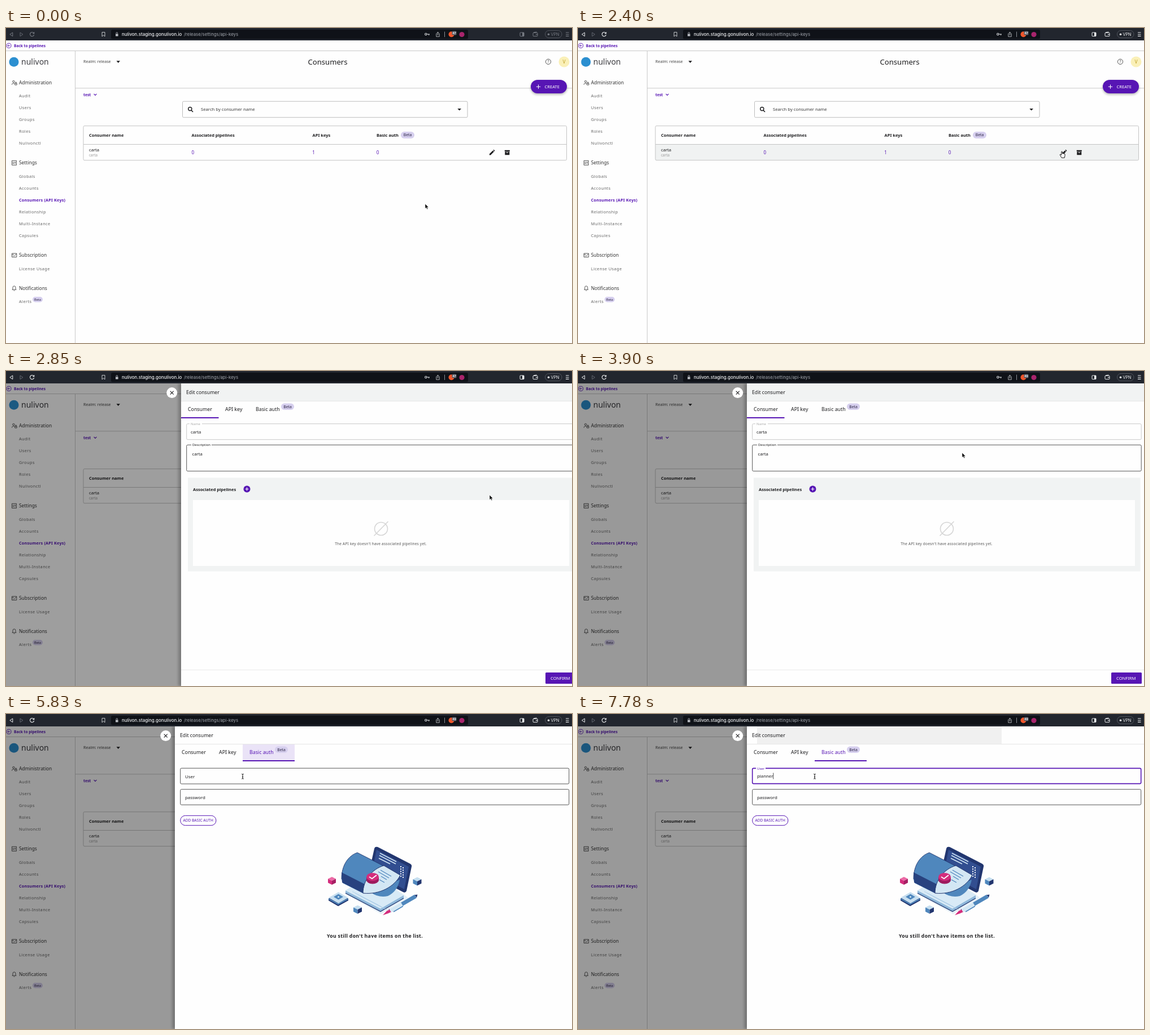
An HTML page for the animation above (8000 ms loop, 1002 by 559 pixels).

```html
<!DOCTYPE html>
<html lang="en">
<head>
<meta charset="utf-8">
<title>Edit consumer</title>
<style>
html, body { margin: 0; width: 100%; height: 100%; overflow: hidden; background: #fefefe; }
svg { display: block; width: 1002px; height: 559px; font-family: "Noto Sans", "Open Sans", sans-serif; }
text { white-space: pre; }
.ui { font-family: Inter, Roboto, sans-serif; }
</style>
</head>
<body>
<svg id="stage" viewBox="0 0 1002 559" xmlns="http://www.w3.org/2000/svg"></svg>
<script>
const PURPLE = '#5715b4', INK = '#1d1d1f', GREY = '#666', LINE = '#c9c9c9';
const NAVY = '#22366f', BLUE = '#4f87bd', PALE = '#d3e7f4', PINK = '#d42d7d';

// Drawing helpers, each returning SVG markup
const text = (x, y, s, size, fill = INK, extra = '') =>
  `<text x="${x}" y="${y}" font-size="${size}" fill="${fill}" ${extra}>${s}</text>`;
const rect = (x, y, w, h, fill, extra = '') =>
  `<rect x="${x}" y="${y}" width="${w}" height="${h}" fill="${fill}" ${extra}/>`;
const circle = (x, y, r, fill, extra = '') =>
  `<circle cx="${x}" cy="${y}" r="${r}" fill="${fill}" ${extra}/>`;
const fillPath = (d, fill, extra = '') => `<path d="${d}" fill="${fill}" ${extra}/>`;
const stroke = (d, color, width = 1, extra = '') =>
  `<path d="${d}" fill="none" stroke="${color}" stroke-width="${width}" ${extra}/>`;
const group = (id, body, extra = '') => `<g id="${id}" ${extra}>${body}</g>`;
const box = (x, y, w, h, color, width = 1) =>
  rect(x, y, w, h, 'none', `rx="2" stroke="${color}" stroke-width="${width}"`);
const medium = 'font-weight="500"', semi = 'font-weight="600"', bold = 'font-weight="700"';
const middle = 'text-anchor="middle"';

function badge(x, y, w, h, size) {
  return rect(x, y, w, h, '#d6cfee', `rx="${h / 2}"`) +
    text(x + w / 2, y + h / 2 + size * .36, 'Beta', size, '#2c2546', middle);
}

function browserBar() {
  const reload = 'M49.3 9.4A3.6 3.6 0 1 0 49.6 12M49.8 7.2V9.8H47.2';
  return rect(0, 0, 1002, 22, '#22262e') +
    rect(186, 3, 632, 16.5, '#0f1218', 'rx="2.5"') +
    stroke('M25 8L30 11.3 25 14.6z', '#6a6e76', .9) +
    stroke('M170 7.5H175V15L172.5 12.8 170 15z', '#d5d7da', .9) +
    rect(194, 10.5, 4.6, 4, '#b9bcc2', 'rx=".6"') + stroke('M195 10.5V9a1.3 1.3 0 0 1 2.6 0V10.5', '#b9bcc2', .8) +
    text(205, 14, 'nulivon.staging.gonulivon.io', 7.9, '#f2f3f5', 'class="ui" font-weight="500"') +
    text(315, 14, '/release/settings/api-keys', 7.8, '#a3a7ae', 'class="ui"') +
    group('key', circle(743.3, 11, 1.7, 'none', 'stroke="#d5d7da" stroke-width="1.1"') +
      stroke('M745 11H750M748.6 11V13', '#d5d7da', 1.1)) +
    stroke('M763 10H761.8V15.3H767.2V10H766M764.5 13V7.2M762.8 8.8L764.5 7.1 766.2 8.8', '#d5d7da', .8) +
    stroke('M776.5 6.5V16', '#8b8f96', 1) +
    circle(788.5, 11.3, 5, '#f0562b') + rect(789.5, 5.5, 8, 7, '#5b5f69', 'rx="1.5"') +
    `<text id="count" x="793.5" y="10.8" font-size="5" fill="#fff" class="ui" ${semi} ${middle}>47</text>` +
    circle(807, 11.5, 4.6, '#a8246c') +
    group('controls',
      stroke('M11.8 8L6.8 11.3 11.8 14.6z', 'currentColor', 1) + stroke(reload, 'currentColor', 1.1) +
      rect(910, 8, 7, 6.6, 'none', 'stroke="currentColor" rx=".8"') + rect(914, 8, 3, 6.6, 'currentColor') +
      rect(933, 8.4, 8, 6.2, 'none', 'stroke="currentColor" rx="1"') +
      stroke('M934 8L939.5 6.8M937.8 11.5H941', 'currentColor', 1) +
      rect(954.5, 4.5, 29.5, 13, 'none', 'rx="6.5" stroke="#5b5f68" stroke-width=".8"') +
      circle(960.5, 11.3, 1.8, 'currentColor') + text(964.5, 13.8, 'VPN', 7.2, 'currentColor', 'class="ui"') +
      stroke('M991 8H996.5M991 11.2H996.5M991 14.4H996.5', 'currentColor', 1.1));
}

function sidebar() {
  const heading = (y, s) => text(23, y + 3, s, 8.4, '#333');
  const item = (y, s) => text(23, y + 2.8, s, 7.3, GREY, 'letter-spacing=".46"');
  const icon = d => stroke(d, '#444', .9);
  const items = [[120, 'Audit'], [141, 'Users'], [162, 'Groups'], [183, 'Roles'], [204, 'Nulivonctl'],
    [263, 'Globals'], [284, 'Accounts'], [326, 'Relationship'], [347, 'Multi-Instance'],
    [368, 'Capsules'], [427, 'License Usage'], [485, 'Alerts']];
  const headings = [[97, 'Administration'], [239, 'Settings'], [403, 'Subscription'], [461.5, 'Notifications']];
  return circle(5, 31.3, 4.1, 'none', `stroke="${PURPLE}" stroke-width=".9"`) +
    stroke('M7.2 31.3H3M4.8 29.4L2.9 31.3 4.8 33.2', PURPLE, .9) +
    text(14, 33.8, 'Back to pipelines', 6.6, PURPLE, semi) +
    stroke('M0 40.5H1002M122.5 41V559M123 106.8H1002', LINE) +
    circle(14, 60.3, 8.5, '#2b8fd0') + text(27, 64.8, 'nulivon', 14, '#3c3c40') +
    headings.map(h => heading(...h)).join('') + items.map(i => item(...i)).join('') +
    text(23, 307.8, 'Consumers (API Keys)', 7.3, PURPLE, bold + ' letter-spacing=".17"') +
    badge(47, 477, 18, 9.5, 5.6) +
    icon('M10.5 100.5V99.3Q13 97 15 98.3M11.7 95a1.7 1.7 0 1 0 3.4 0a1.7 1.7 0 1 0-3.4 0M15.7 98.3H19.2V101H15.7zM16.5 98.2V97a1 1 0 0 1 2 0V98.2') +
    icon('M10.5 235.3H18.5V243.3H10.5zM12.8 237V241.6M16 237V241.6M11.9 240H13.7M15.1 238.4H16.9') +
    icon('M10.5 400H18.8V406.6H10.5zM10.5 402H14M12.3 404.7H13.6M14.5 405L18.8 400.2') +
    icon('M11 464.3L12 463V460.6a2.5 2.7 0 0 1 5 0V463L18 464.3zM13.6 466H15.4');
}

function listPage() {
  const head = (x, s) => text(x, 193, s, 7.5, INK, semi);
  const num = (x, s) => text(x, 223.8, s, 8, PURPLE);
  return text(137, 62.3, 'Realm: release', 7.1, '#444') + fillPath('M195.5 58.3H202L198.7 62z', INK) +
    text(569.5, 64.7, 'Consumers', 13.1, INK, medium + ' ' + middle) +
    circle(960, 59.8, 4.6, 'none', 'stroke="#444" stroke-width=".9"') +
    text(960, 62.4, '?', 7, '#444', middle) +
    circle(988, 60, 9.5, '#faf0b8') + text(988, 63, 'V', 8.4, '#bf9f26', middle) +
    rect(929, 94, 64, 24, '#000', 'rx="12" opacity=".3" filter="url(#blur)"') +
    rect(929, 92, 64, 24, PURPLE, 'rx="12"') +
    stroke('M938.8 104.2H946.2M942.5 100.5V107.9', '#fff', 1) +
    text(953.5, 106.9, 'CREATE', 7.6, '#fff', medium) +
    text(137, 120.5, 'test', 6.8, PURPLE, bold) + stroke('M155.6 116.8L158 119.3 160.4 116.8', PURPLE, 1.2) +
    box(312.5, 130.2, 504.5, 28.5, '#bdbdbd') +
    circle(325.8, 143.6, 3.1, 'none', `stroke="${INK}" stroke-width="1.4"`) + stroke('M328 145.9L331 149', INK, 1.5) +
    text(345, 147.4, 'Search by consumer name', 7.7, '#3a3a3a') + fillPath('M799.3 143H806L802.6 146.6z', INK) +
    `<rect id="row" x="137" y="206.5" width="855.5" height="28"/>` +
    box(137, 173.7, 855.5, 61, '#c4c4c4') + stroke('M137 206.5H992.5', '#c4c4c4') +
    head(147, 'Consumer name') + head(328.5, 'Associated pipelines') + head(542.5, 'API keys') + head(656, 'Basic auth') +
    badge(699, 184, 24, 12, 6.8) +
    text(147, 219, 'carta', 7.6, INK, medium) + text(147, 228, 'carta', 6.3, '#999') +
    num(328.4, '0') + num(542.3, '1') + num(655.7, '0') +
    fillPath('M855.8 225.5V223.4L861.8 217.4 863.9 219.5 857.9 225.5zM862.4 216.8L863.5 215.8 865.5 217.8 864.5 218.9z', INK) +
    fillPath('M882.8 216.8H891.8V219H882.8zM883.3 219.6H891.3V225.2H883.3z', INK) + rect(885.8, 220.6, 3, 1, '#fff');
}

const cube = (x, y, s, top, left, right) =>
  fillPath(`M${x} ${y - s}l${s} ${-s * -.5}l${-s} ${s * .5}l${-s} ${-s * .5}z`, top) +
  fillPath(`M${x - s} ${y - s / 2}l${s} ${s / 2}v${s}l${-s} ${-s / 2}z`, left) +
  fillPath(`M${x + s} ${y - s / 2}l${-s} ${s / 2}v${s}l${s} ${-s / 2}z`, right);

function illustration() {
  let keys = '', dots = '';
  for (let i = 0; i < 4; i++) keys += `M${613 + i * 5} ${315 + i * 2.8}l46 24`;
  for (let i = 0; i < 10; i++) dots += rect(698 + i % 2 * 4, 270 + (i >> 1) * 4.2 + i % 2 * 2, 2, 2, '#fff');
  return fillPath('M602 320L664 355 712 326 690 310z', '#e6f0f7') +
    fillPath('M601 313V318L663 350.5V345zM663 345V350.5L704 327V321.5z', '#8fb8da') +
    stroke('M601 318L663 350.5 704 327', NAVY, 1.2) +
    fillPath('M601 313L645 286 704 321.5 663 345.5z', '#d8eaf6') + stroke(keys, '#a9cbe5', .8) +
    fillPath('M652 239Q653 234.5 658 236L716 266Q719 268 718 271L709 314Q707 318 703 316L642 284z', NAVY) +
    fillPath('M656 241L713 271 705 311 648 280z', '#324e90') +
    stroke('M662 247L691 262M661 251L690 266M660 256L680 266', PALE, 1.5) + dots +
    fillPath('M645 316L697 294Q693 315 676 323Q660 327 645 316z', BLUE) +
    fillPath('M594 293C594 267 607 251 622 246L669 270C648 276 634 295 632 318L596 300z', BLUE) +
    stroke('M594 293C594 267 607 251 622 246L669 270', NAVY, .9) +
    fillPath('M594 281L637 303Q633 311 632 318L595 299z', '#28427f') +
    fillPath('M632 318C632 295 648 275 669 269L698 286C688 306 662 321 632 318z', PALE, `stroke="${NAVY}" stroke-width="1"`) +
    stroke('M663 277L682 288M659 280L678 291M664 288L674 294M661 294L670 299', BLUE, 1.3) +
    fillPath('M638 290v5a11 6.5 0 0 0 22 0v-5z', '#9e1b5e') +
    `<ellipse cx="649" cy="289" rx="11" ry="7" fill="${PINK}"/>` + stroke('M643 289L648 292.2 656 286', '#fff', 1.9) +
    cube(577, 296, 7, '#ec6aa6', PINK, '#a71f64') + cube(728, 297, 7.5, '#c6dff0', BLUE, NAVY) +
    cube(622.5, 347, 7.5, '#c6dff0', BLUE, NAVY) +
    fillPath('M571 327V331L588 341 606 331V327z', NAVY) + fillPath('M571 327V329L588 338.5V336zM588 336V338.5L606 329V327z', BLUE) +
    fillPath('M571 326L588.5 316 606 326 588.5 336z', '#c7dff0') +
    fillPath('M580 324.5L588.5 319.5 597 324.5 588.5 329.5z', BLUE) + circle(588.5, 324.5, 1.5, PALE) +
    stroke('M700 338L725 323.5', BLUE, 7) + fillPath('M723.5 321L728.5 320.5 727 326z', NAVY) +
    stroke('M681 349L701 337.5', PALE, 7) + stroke('M678 346L681 352', NAVY, 1) + stroke('M686 351L703 341', BLUE, 1.6) +
    fillPath('M667 357L674 349.5 679 347 681.5 351.5 676 354z', PINK);
}

// Panel content is laid out from the panel's own left edge
function consumerTab() {
  return stroke('M0 83H66.5', PURPLE, 2.2) +
    box(9.7, 93.7, 688.5, 28, '#c8c8c8') + rect(15, 92, 22, 4, '#fefefe') + text(17, 95.8, 'Name', 6, '#aaa') +
    text(17, 110.7, 'carta', 7.7) +
    box(9.7, 131.2, 688.5, 46.5, '#555') + rect(18, 129, 36, 4, '#fefefe') + text(20, 133.2, 'Description', 5.95) +
    text(19.5, 149.7, 'carta', 7.7) +
    rect(12, 189.5, 684.5, 166, '#f1f3f3') + text(21, 212.5, 'Associated pipelines', 7.5, INK, semi) +
    circle(116.5, 209.5, 6, PURPLE) + stroke('M113.5 209.5H119.5M116.5 206.5V212.5', '#fff', 1.2) +
    rect(21, 229, 666, 117, '#fefefe') +
    circle(354, 280, 11.5, 'none', 'stroke="#d6d6d6" stroke-width="1.6"') + stroke('M341.5 292.5L366.5 267', '#d6d6d6', 1.6) +
    text(353.5, 309, 'The API key doesn\'t have associated pipelines yet.', 6.5, '#555', middle + ' letter-spacing=".22"') +
    stroke('M0 530.5H703', '#eaeaea') + rect(645, 535, 54, 20, PURPLE, 'rx="1.5"') +
    text(654, 547.8, 'CONFIRM', 7.6, '#fff', medium);
}

function authTab() {
  return stroke('M120 83H212', PURPLE, 2.2) +
    group('idle', box(9.7, 96.2, 688, 27.8, '#555') + text(18, 113.8, 'User', 7.9)) +
    group('focus', box(9.7, 96.4, 688, 27.2, PURPLE, 1.6) + rect(16, 95, 17, 4, '#fefefe') +
      text(18, 98.7, 'User', 6, PURPLE) + '<text id="typed" x="18" y="113" font-size="7.8" fill="#1d1d1f"></text>' +
      `<rect id="caret" y="104.5" width=".8" height="11" fill="${INK}"/>`) +
    box(9.7, 133.7, 688, 27.5, '#555') + text(18, 150.9, 'password', 7.9) +
    rect(9.7, 180.3, 63.2, 17.4, 'none', `rx="8.7" stroke="${PURPLE}"`) +
    text(41.2, 191.3, 'ADD BASIC AUTH', 6.6, PURPLE, middle) +
    `<g transform="translate(-299)">${illustration()}</g>` +
    text(354, 397, 'You still don\'t have items on the list.', 8.7, INK, bold + ' ' + middle + ' letter-spacing=".32"');
}

function panel() {
  return rect(-5, 22, 10, 537, '#000', 'opacity=".22" filter="url(#blur)"') + rect(0, 22, 703, 537, '#fefefe') +
    circle(-16.3, 38.6, 9.5, '#fff') + stroke('M-19.3 35.6L-13.3 41.6M-13.3 35.6L-19.3 41.6', INK, 1.1) +
    '<rect id="header" y="22" width="703" height="31"/>' + group('shade', rect(18, 22, 433, 31, '#f0f0f0')) +
    group('hover', rect(120, 54, 92, 29, '#eae3f7')) + stroke('M0 53.5H703', '#e6e6e6') +
    text(9, 41, 'Edit consumer', 8.7, INK, medium) +
    text(12, 71.3, 'Consumer', 8.8) + text(78, 71.3, 'API key', 8.9) +
    `<text id="authLabel" x="132" y="71.3" font-size="8.8">Basic auth</text>` + badge(177, 57.5, 23, 11.5, 6.8) +
    group('consumer', consumerTab()) + group('auth', authTab());
}

const arrow = fillPath('M0 0V8.5L2 6.7 3.4 9.8 4.9 9.1 3.5 6.2H6.1z', '#000', 'stroke="#fff" stroke-width=".6"');
const hand = fillPath('M-.2 -1V5L-1.8 3.8Q-3.2 3.6 -2.7 4.8L.2 9.8H5.2L6 6V3Q5.2 2.1 4.5 2.8Q3.8 1.8 3 2.5Q2.2 1.5 1.4 2.2V-1Q.6 -1.9 -.2 -1z', '#fff', 'stroke="#000" stroke-width=".9"');
const beam = stroke('M-1.8 -4.4Q0 -4.4 0 -3V3Q0 4.4 -1.8 4.4M1.8 -4.4Q0 -4.4 0 -3M0 3Q0 4.4 1.8 4.4M-1 .9H1', '#000', .9);

const $ = id => document.getElementById(id);
$('stage').innerHTML =
  '<defs><filter id="blur" x="-100%" y="-50%" width="300%" height="200%"><feGaussianBlur stdDeviation="2"/></filter></defs>' +
  rect(0, 0, 1002, 559, '#fefefe') + sidebar() + listPage() +
  '<rect id="dim" y="22" width="1002" height="537"/>' + group('panel', panel()) + browserBar() +
  group('cursor', group('arrow', arrow) + group('hand', hand) + group('beam', beam));

// Step tables: [start time, values...]
const pointer = [
  [0, 742, 312, 'arrow'], [750, 747, 309, 'arrow'], [900, 772, 292, 'arrow'], [1050, 812, 260, 'arrow'],
  [1200, 846, 232, 'arrow'], [1350, 860, 222, 'arrow'], [1500, 856, 220, 'arrow'],
  [2250, 856, 220.5, 'hand'], [2700, 856, 220, 'arrow'],
  [3600, 848, 214, 'arrow'], [3750, 790, 186, 'arrow'], [3900, 680, 145, 'arrow'], [4050, 560, 104, 'arrow'],
  [4200, 485, 80, 'arrow'], [4330, 453, 73, 'arrow'], [4480, 478, 71, 'arrow'],
  [5380, 474, 75, 'arrow'], [5530, 452, 90, 'arrow'], [5680, 426, 104, 'arrow'], [5830, 419, 110.8, 'beam']];
const slide = [[0, 1020, 0], [2700, 615.3, .27], [2850, 310, .38], [3000, 299, .4]];
const rowFill = [[0, '#fefefe'], [2250, '#f7f8f8'], [2400, '#f0f2f2'], [2700, '#fefefe']];
const typing = [[0, 0], [6880, 1], [7030, 2], [7330, 3], [7480, 4], [7630, 6], [7780, 7]];

const at = (steps, t) => steps.findLast(s => s[0] <= t);
const show = (id, on) => $(id).setAttribute('display', on ? 'inline' : 'none');

function draw(t) {
  const [, x, y, shape] = at(pointer, t);
  $('cursor').setAttribute('transform', `translate(${x} ${y})`);
  for (const id of ['arrow', 'hand', 'beam']) show(id, id === shape);

  const [, left, dim] = at(slide, t);
  $('panel').setAttribute('transform', `translate(${left})`);
  show('panel', t >= 2700);
  $('dim').setAttribute('opacity', dim);
  $('row').setAttribute('fill', at(rowFill, t)[1]);
  $('controls').setAttribute('color', t < 1950 ? '#777b83' : '#eceef0');
  $('count').textContent = t < 3000 ? '47' : '49';

  const auth = t >= 4780, focus = t >= 6130;
  show('consumer', !auth);
  show('auth', auth);
  show('hover', auth && !focus);
  show('idle', !focus);
  show('focus', focus);
  show('shade', t >= 7030);
  show('key', t < 7030);
  $('header').setAttribute('fill', auth ? '#fefefe' : '#f1f3f3');
  $('authLabel').setAttribute('fill', auth ? PURPLE : INK);

  const typed = $('typed');
  typed.textContent = 'planner'.slice(0, at(typing, t)[1]);
  show('caret', t < 6580 || t >= 6880);
  $('caret').setAttribute('x', 18 + (typed.textContent ? typed.getComputedTextLength() : 0));
}

const start = performance.now();
function tick() {
  draw((performance.now() - start) % 8000);
  requestAnimationFrame(tick);
}
tick();
</script>
</body>
</html>
```
